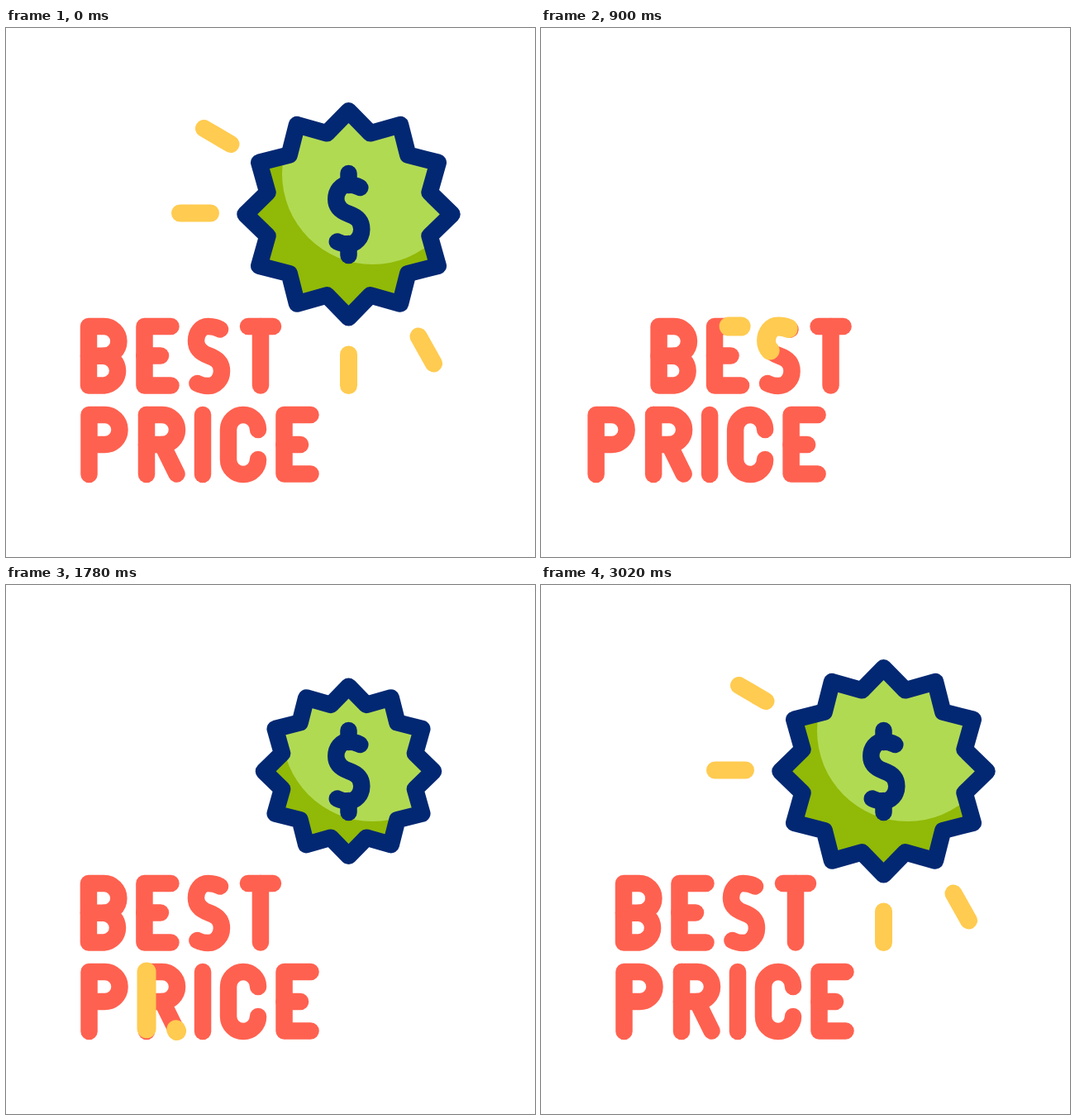
These frames come from a looping animation (640 px wide and 640 px high, 3200 ms). An HTML page:

```html
<!DOCTYPE html>
<html lang="en">
<head>
<meta charset="utf-8">
<title>Best price</title>
<style>
  html, body { margin: 0; width: 100%; height: 100%; overflow: hidden; background: #fff; }
  svg { display: block; width: 100vw; height: 100vh; }
  path { fill: none; stroke-linecap: round; stroke-linejoin: round; }
  .ink { stroke: #ff6150; stroke-width: 20.5; }
  .glow { stroke: #ffcb50; stroke-width: 23; }
  .ray { stroke: #ffcb50; stroke-width: 21; }
  .navy { stroke: #022873; stroke-width: 20.5; }
</style>
</head>
<body>
<svg viewBox="0 0 640 640" role="img" aria-label="Best price">
  <clipPath id="inside"><path class="star"/></clipPath>
  <g id="rays"></g>
  <g id="badge">
    <path class="star" style="fill:#91b907"/>
    <circle cx="443.5" cy="176.5" r="109.5" fill="#b1da53" clip-path="url(#inside)"/>
    <path class="star navy"/>
  </g>
  <g id="dollar"></g>
  <g id="best"></g>
  <g id="price"></g>
</svg>
<script>
const LOOP = 3200, TRACE = 570, LAG = 0.26;
const $ = id => document.getElementById(id);
const clamp = x => Math.min(1, Math.max(0, x));
const ease = x => (x = clamp(x), x * x * (3 - 2 * x));
const ramp = (t, from, to) => ease((t - from) / (to - from));

// Eased value between [time, value] keys
function track(t, keys) {
  let v = keys[0][1];
  for (let i = 1; i < keys.length; i++) {
    const [t0, v0] = keys[i - 1], [t1, v1] = keys[i];
    if (t >= t0) v = v0 + (v1 - v0) * ramp(t, t0, t1);
  }
  return v;
}

function addPath(parent, cls, d) {
  const p = document.createElementNS("http://www.w3.org/2000/svg", "path");
  p.setAttribute("class", cls);
  p.setAttribute("d", d);
  parent.append(p);
  return p;
}

// A run of paths that can be trimmed as if it were one long stroke
function makeStroke(parent, cls, parts) {
  const pieces = parts.map(d => {
    const el = addPath(parent, cls, d);
    return { el, len: el.getTotalLength() };
  });
  const total = pieces.reduce((sum, p) => sum + p.len, 0);
  return (tail, head) => {
    let at = 0;
    for (const { el, len } of pieces) {
      const a = Math.max(0, tail * total - at);
      const b = Math.min(len, head * total - at);
      const shown = b - a > 0.3;
      el.style.display = shown ? "" : "none";
      if (shown) {
        el.style.strokeDasharray = `${b - a} 9999`;
        el.style.strokeDashoffset = -a;
      }
      at += len;
    }
  };
}

const ess = (x, y) => `M${x + 29} ${y + 3.5}c-5-2.6-10-3.5-14.5-3.5c-8.5 0-14.5 8-14.5 17.5` +
  `c0 11 8.5 15.5 15.5 18c7.5 2.6 15.5 6.8 15.5 18.5c0 10-7 18-16.5 18c-5 0-9.5-1.2-13-3`;
const eee = (x, y) => `M${x + 32} ${y + 71.5}h-32v-71.5h32`;
const bar = (x, y) => `M${x} ${y}h19.5`;

const S = ess(230, 361);
const P = "M100.5 540V468H119.5a18 18 0 0 1 0 36H100.5";
const R = ["M170 540V468", "M206.5 539.5L189 504a18 18 0 0 0 0-36H170"];
const T = ["M308 432.5V361", "M293 361H323"];
const C = "M305 486a18 18 0 0 0-36 0V522a18 18 0 0 0 36 0";
const B = "M100 396.5V432.5H118.5a17.9 17.9 0 0 0 0-35.7a17.9 17.9 0 0 0 0-35.8H100Z";

// ink: drawn letter; glow: route of the highlight; at: its start time
const letters = [
  { line: "best", at: 218, ink: [B, "M100 396.7H118.5"], glow: [B] },
  { line: "best", at: 418, ink: [eee(167.5, 361), bar(167.5, 396.5)], glow: [eee(167.5, 361)] },
  { line: "best", at: 719, ink: [S], glow: [S] },
  { line: "best", at: 892, ink: T, glow: T },
  { line: "price", at: 1191, ink: [P], glow: [P.replace("540", "532")] },
  { line: "price", at: 1600, ink: [...R, "M170 504H189"], glow: R },
  { line: "price", at: 1860, ink: ["M238 468V540"], glow: ["M238 468V540"] },
  { line: "price", at: 2155, ink: [C], glow: [C] },
  { line: "price", at: 2450, ink: [eee(336.5, 468), bar(336.5, 504)], glow: [eee(336.5, 468)] }
];
for (const l of letters) l.ink.forEach(d => addPath($(l.line), "ink", d));
for (const l of letters) l.trim = makeStroke($(l.line), "glow", l.glow);

const rays = ["M272 140.5L239.5 121.5", "M247.5 224H210.5", "M414.5 395V432.5", "M499 373L517.5 406"]
  .map(d => makeStroke($("rays"), "ray", [d]));
const dollar = makeStroke($("dollar"), "navy",
  ["M414.5 176V190", ess(399.3, 189.5), "M414.5 261V275"]);

const stars = document.querySelectorAll(".star");
function starPath(scale) {
  const pts = [];
  for (let i = 0; i < 24; i++) {
    const r = (i % 2 ? 101.5 : 125) * scale, a = i * Math.PI / 12;
    pts.push((414.5 + r * Math.sin(a)).toFixed(2) + " " + (225.3 - r * Math.cos(a)).toFixed(2));
  }
  return "M" + pts.join("L") + "Z";
}

const starKeys = [[0, 1], [420, 1], [620, 1.176], [870, 0], [1400, 0], [2000, 1.176], [2200, 1]];
const bestKeys = [[0, 0], [365, -31.5], [700, 50], [1600, -8.5], [1790, 0]];
const priceKeys = [[0, 0], [365, 31.5], [700, -40], [1600, 8], [1790, 0]];

function draw(t) {
  $("best").setAttribute("transform", `translate(${track(t, bestKeys)} 0)`);
  $("price").setAttribute("transform", `translate(${track(t, priceKeys)} 0)`);
  for (const l of letters) {
    const u = (t - l.at) / TRACE;
    l.trim(ease((u - LAG) / (1 - LAG)), ease(u / (1 - LAG)));
  }

  const back = t > 1000;
  for (const ray of rays) {
    if (back) ray(0, ramp(t, 2000, 2400));
    else ray(ramp(t, 0, 400), 1);
  }
  if (back) dollar(0, ramp(t, 1400, 1640));
  else dollar(ramp(t, 620, 870), 1);

  const scale = track(t, starKeys);
  $("badge").style.display = scale > 0.002 ? "" : "none";
  const d = starPath(scale);
  stars.forEach(s => s.setAttribute("d", d));
}

const begin = performance.now();
function tick() {
  draw((performance.now() - begin) % LOOP);
  requestAnimationFrame(tick);
}
tick();
</script>
</body>
</html>
```
